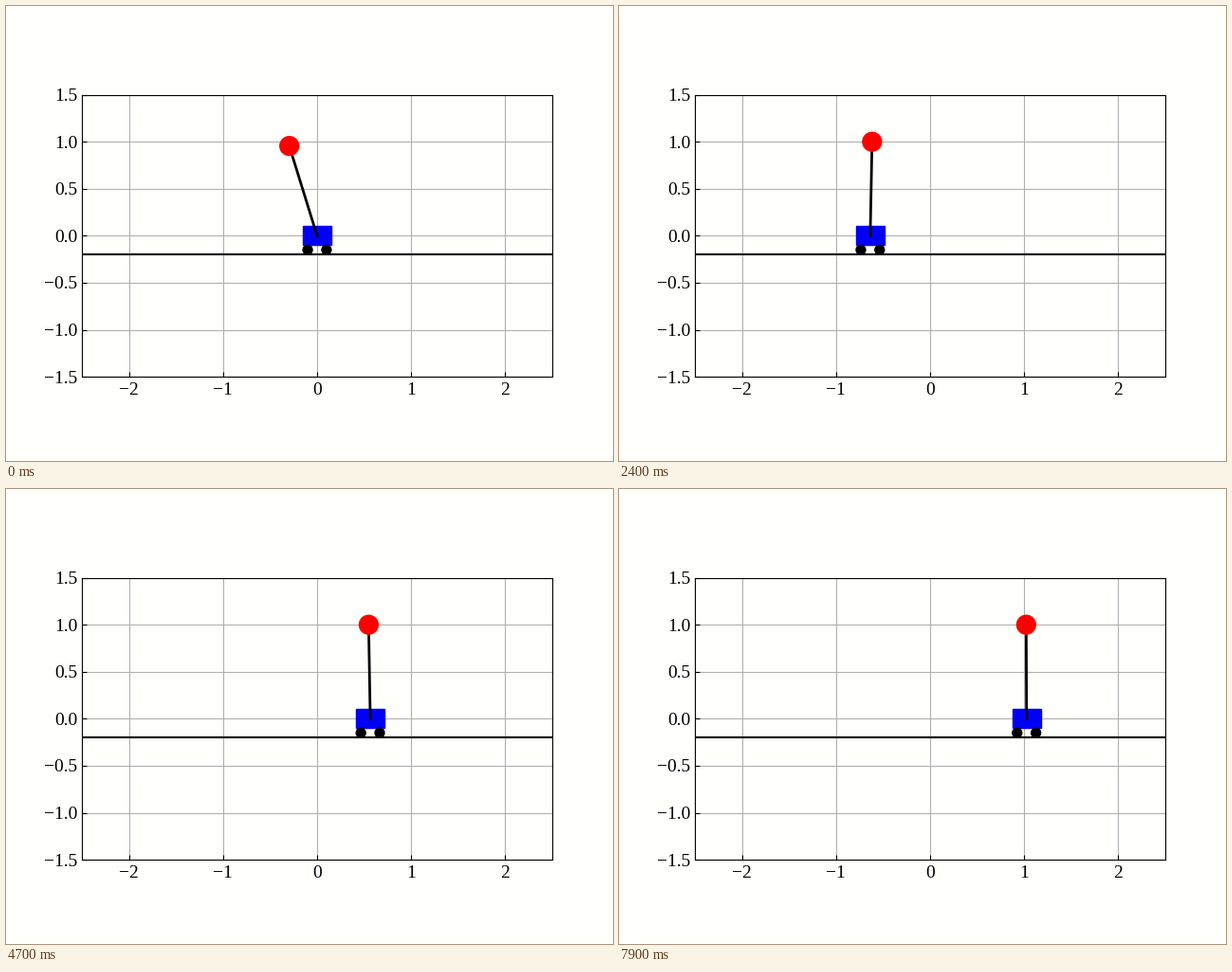
Recreate the animation shown at these times as a matplotlib script. Size 640x480 px, loop 8000 ms.

```python
import numpy as np
import matplotlib.pyplot as plt
from matplotlib.animation import FuncAnimation
from matplotlib.patches import Circle, Rectangle

FRAMES, STEP = 80, 100          # frames, ms per frame
G, ROD, TARGET = 9.8, 1.0, 1.0
CART_W, CART_H = 0.3, 0.2
PAPER = "#fffffc"

plt.rcParams.update({
    "font.family": "Liberation Serif",
    "font.size": 14,
    "xtick.direction": "in",
    "ytick.direction": "in",
    "xtick.major.pad": 4.2,
})

# Closed-loop modes of the balanced cart: a slow and a fast damped pair.
SLOW, T0, K = -0.556 - 0.42j, 7.3, 0.12
FAST = -3.13 + 1.898j
TILT = np.sin(0.3)

slow0 = K * np.exp(-SLOW * T0)
r0 = TARGET + TILT - slow0.imag
v0 = -(slow0 * SLOW).imag       # bob starts at rest
fast0 = r0 - 1j * (v0 - FAST.real * r0) / FAST.imag


def pose(t):
    """Cart position and bob position at time t (seconds)."""
    slow = slow0 * np.exp(SLOW * t)
    fast = fast0 * np.exp(FAST * t)
    bob = TARGET - slow.imag - fast.real
    lean = ((slow * SLOW**2).imag + (fast * FAST**2).real) / G
    return bob + lean, bob, np.sqrt(ROD**2 - lean**2)


fig = plt.figure(figsize=(6.4, 4.8), dpi=100, facecolor=PAPER)
ax = fig.add_subplot(facecolor=PAPER)
ax.set_aspect("equal")
ax.set(xlim=(-2.5, 2.5), ylim=(-1.5, 1.5),
       xticks=np.arange(-2, 3), yticks=np.arange(-1.5, 1.6, 0.5))
ax.set_axisbelow(True)
ax.grid(color="#b0b0b0", lw=0.8)
ax.axhline(-0.2, color="black", lw=1.5)

cart = ax.add_patch(Rectangle((0, -CART_H / 2), CART_W, CART_H,
                              color="#0000f6", zorder=3))
wheels = [ax.add_patch(Circle((0, -0.15), 0.05, color="black", zorder=3))
          for _ in range(2)]
rod, = ax.plot([], [], color="black", lw=2, zorder=4)
ball = ax.add_patch(Circle((0, 0), 0.1, color="red", zorder=5))


def draw(i):
    x, bx, by = pose(i * STEP / 1000)
    cart.set_x(x - CART_W / 2)
    for wheel, dx in zip(wheels, (-0.1, 0.1)):
        wheel.center = x + dx, -0.15
    rod.set_data([x, bx], [0, by])
    ball.center = bx, by
    return cart, *wheels, rod, ball


anim = FuncAnimation(fig, draw, frames=FRAMES, interval=STEP,
                     repeat=True, repeat_delay=0, blit=False)
plt.show()
```
